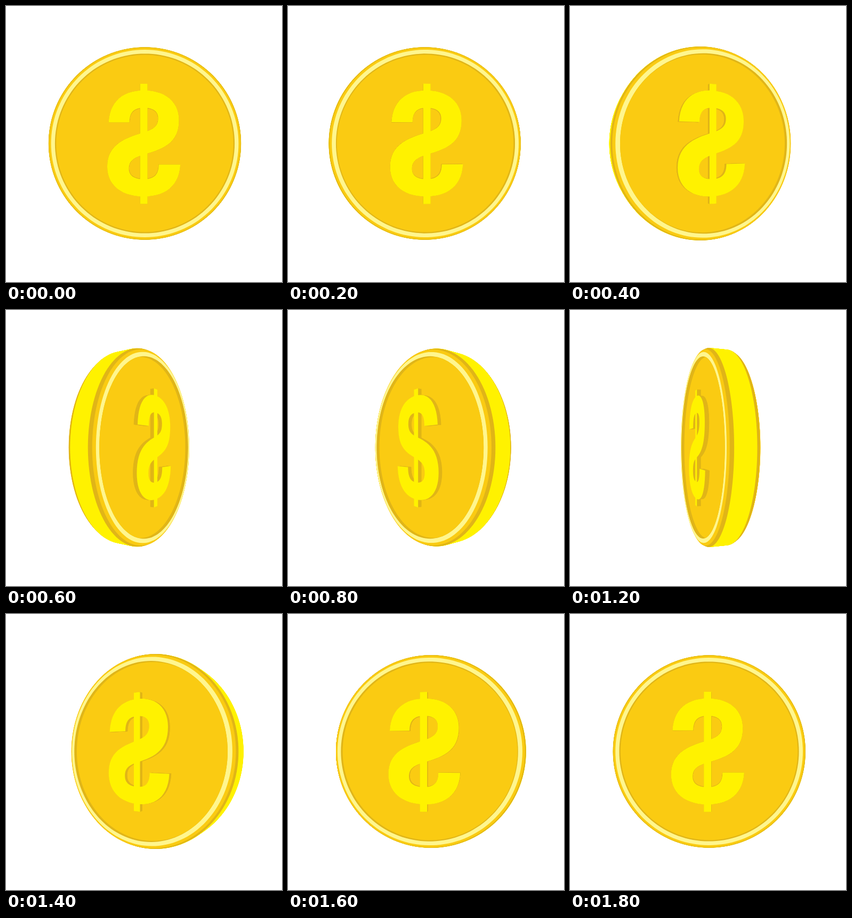
Animation of 518x518 px, one loop 1900 ms. Source, as an HTML page with a canvas:

```html
<!DOCTYPE html>
<html lang="en">
<head>
<meta charset="utf-8">
<title>Spinning coin</title>
<style>
html, body { margin: 0; width: 100%; height: 100%; overflow: hidden; background: #fff; }
canvas { display: block; width: 518px; height: 518px; }
</style>
</head>
<body>
<canvas id="stage" width="518" height="518"></canvas>
<script>
const ctx = document.getElementById('stage').getContext('2d');

const LOOP = 1900, STEP = 100;
const CX = 260.5, CY = 258, CAM = 520;

// coin profile: half thicknesses and radii from face to edge
const FACE = 23.5, SHOULDER = 21, BAND = 15.5;
const R_FACE = 168, R_SHOULDER = 172.5, R_BAND = 175.3, R_INNER = 161;
const FLOOR = 16.5, TOP = 24;               // recessed field and top of the sign

const YELLOW = '#fff200', GOLD = '#facb12', SHADE = '#e0b518', PALE = '#fff68e';

const lerp = (a, b, t) => a + (b - a) * t;
const cubic = (a, b, c, d, t) => {
  const u = 1 - t;
  return u * u * u * a + 3 * u * u * t * b + 3 * u * t * t * c + t * t * t * d;
};

// slow start, fast middle, slow end: cubic-bezier(.56, 0, .4, 1)
function ease(x) {
  let lo = 0, hi = 1;
  for (let i = 0; i < 30; i++) {
    const mid = (lo + hi) / 2;
    if (cubic(0, 0.56, 0.4, 1, mid) < x) lo = mid; else hi = mid;
  }
  return cubic(0, 0, 1, 1, lo);
}

// one half of the S; the other half is the same turned by 180 degrees
const HALF_S = [
  [-66, -39.5],
  [-64, -80, -38, -99.5, 0, -99.5], [41, -99.5, 66, -78, 66, -43.5],
  [66, -6, 42, 8, 7.5, 18.5], [-14, 25, -27, 30, -27, 47],
  [-27, 61, -17, 67, 0, 67], [19, 67, 27, 58, 27, 39.5]
];
const LOWER_WIDTH = 1.04;                   // the lower bowl is slightly wider

function flatten(segs) {
  const pts = [segs[0]];
  for (const s of segs.slice(1)) {
    const [x, y] = pts[pts.length - 1];
    if (s.length === 2) { pts.push(s); continue; }
    for (let i = 1; i <= 14; i++) {
      const t = i / 14;
      pts.push([cubic(x, s[0], s[2], s[4], t), cubic(y, s[1], s[3], s[5], t)]);
    }
  }
  return pts;
}

function makeSign() {
  const turned = HALF_S.map(s => s.map(v => -v));
  const widen = s => s.map((v, i) => i % 2 === 0 && s[i + 1] > 0 ? v * LOWER_WIDTH : v);
  const bar = [[-7, -112], [7, -112], [7, 113.5], [-7, 113.5]];
  return [flatten([...HALF_S, ...turned].map(widen)), bar];
}

const SIGN = makeSign();
const SIGN_SCALE = (CAM - TOP) / CAM;
const CIRCLE = Array.from({ length: 144 }, (_, i) => {
  const a = i / 144 * 2 * Math.PI;
  return [Math.cos(a), Math.sin(a)];
});

function edge(z) {
  const d = Math.abs(z);
  if (d <= BAND) return [YELLOW, R_BAND];
  if (d < SHOULDER) return [SHADE, lerp(R_BAND, R_SHOULDER, (d - BAND) / (SHOULDER - BAND))];
  return [GOLD, lerp(R_SHOULDER, R_FACE, (d - SHOULDER) / (FACE - SHOULDER))];
}

function draw(turn) {
  const mirrored = Math.cos(turn) > 0;
  const phi = mirrored ? turn : turn - Math.PI;
  const cos = Math.cos(phi), sin = Math.sin(phi);

  function trace(pts, z, scale = 1, flip = 1, dx = 0) {
    ctx.beginPath();
    for (const [px, py] of pts) {
      const x = px * scale * flip + dx;
      const m = CAM / (CAM - z * cos + x * sin);
      ctx.lineTo(CX + (x * cos + z * sin) * m, CY + py * scale * m);
    }
    ctx.closePath();
  }
  function fill(color, ...shape) {
    trace(...shape);
    ctx.fillStyle = color;
    ctx.fill();
  }

  ctx.fillStyle = '#fff';
  ctx.fillRect(0, 0, 518, 518);

  // body: thin slices, painted towards the viewer's position on the coin axis
  const eye = CAM * cos;
  const slices = [];
  for (let z = -FACE; z <= FACE; z += 0.5) slices.push(z);
  slices.sort((a, b) => Math.abs(b - eye) - Math.abs(a - eye));
  for (const z of slices) {
    const [color, r] = edge(z);
    fill(color, CIRCLE, z, r);
  }
  if (eye <= FACE) return;

  // rim and recessed field
  fill(PALE, CIRCLE, FACE, R_FACE);
  ctx.save();
  trace(CIRCLE, FACE, R_INNER);
  ctx.clip();
  fill(SHADE, CIRCLE, FACE, R_INNER + 1);
  fill(GOLD, CIRCLE, FLOOR, R_INNER);
  ctx.restore();

  // raised sign
  const flip = mirrored ? 1 : -1;
  const dx = mirrored ? -1.8 : -0.8;
  for (let z = FLOOR; z <= TOP; z += 0.5) {
    for (const part of SIGN) fill(z < TOP ? SHADE : YELLOW, part, z, SIGN_SCALE, flip, dx);
  }
}

let start = null, shown = -1;
function tick(now) {
  if (start === null) start = now;
  const t = Math.floor((now - start) % LOOP / STEP) * STEP;
  if (t !== shown) {
    shown = t;
    draw(2 * Math.PI * ease(t / LOOP));
  }
  requestAnimationFrame(tick);
}
draw(0);
requestAnimationFrame(tick);
</script>
</body>
</html>
```
